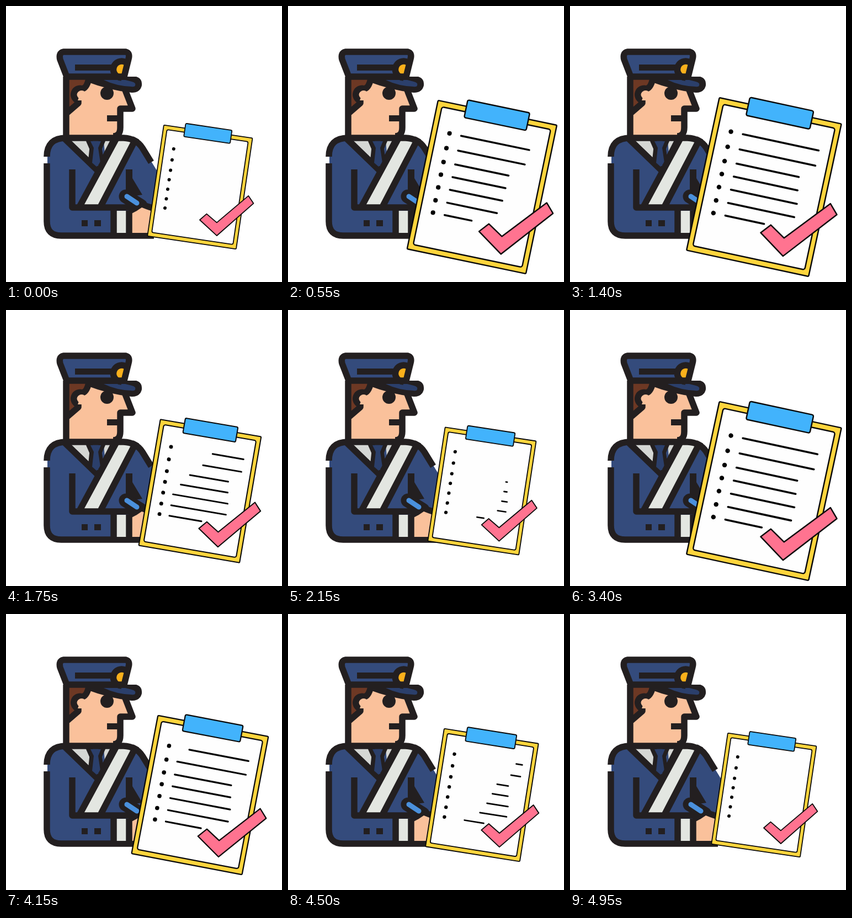
An HTML page for the animation above (5000 ms loop, 500 by 500 pixels).

```html
<!DOCTYPE html>
<html>
<head>
<meta charset="utf-8">
<style>
  html, body { margin: 0; height: 100%; overflow: hidden; background: #fff; }
  svg { display: block; width: 100vw; height: 100vh; }
  .ink { fill: none; stroke: #231f20; stroke-width: 11.5; stroke-linejoin: round; }
  .solid { fill: #231f20; }
  .navy { fill: #344b7c; }
  .dark { fill: #2b3f6b; }
  .skin { fill: #fac19b; }
  .pale { fill: #e3e6e1; }
  .collar { fill: #d5d7d4; }
  .board { stroke: #0a0a0a; stroke-width: 2.5; stroke-linejoin: round; }
  #rows line { stroke: #050505; stroke-width: 3.6; stroke-linecap: round; }
</style>
</head>
<body>
<svg viewBox="0 0 500 500">
  <!-- head -->
  <path class="skin" d="M109 130H213L229 186H207V222Q207 236 194 236H109Z"/>
  <path fill="#6d3824" d="M110 130H149L143 147Q122 147 122 160L130 178L110 196Z"/>
  <path class="ink" d="M109 128V238M109 195L131 176V171M215 150L229 186H207V220Q207 236 194 236"/>
  <path class="ink" d="M150 132Q146 149 138 150A11 11 0 0 0 130 171"/>
  <circle class="skin" cx="137" cy="161" r="8"/>
  <circle class="solid" cx="183" cy="158" r="12"/>
  <path class="solid" d="M183 198h23v11h-23z"/>
  <!-- cap -->
  <path class="solid" d="M146 128H236Q247 131 246 144Q243 157 228 157Q188 153 146 137Z"/>
  <path class="dark" d="M177 134H216L228 137Q236 139 234 144Q233 147 227 146Q200 145 177 134Z"/>
  <path class="navy" d="M104 83H217Q225 85 222 96L214 128H110L98 97Q95 85 104 83Z"/>
  <path class="solid" d="M125 106h70v11h-70z"/>
  <path class="ink" style="fill:#fab01b" d="M217 102A15 15 0 1 0 209 130"/>
  <path class="ink" d="M104 83H217Q225 85 222 96L214 128H110L98 97Q95 85 104 83Z"/>
  <!-- body -->
  <path class="navy" d="M75 273Q76 239 109 239H213Q236 240 247 257L264 283L290 325L258 416H100Q75 416 75 390Z"/>
  <path class="collar" d="M117 244H148L157 286ZM177 244H191L179 266Z"/>
  <path class="pale" d="M200 244H230L167 361H139Z"/>
  <path class="ink" d="M107 241L166 298M150 242L157 258L154 287M175 242L168 258L172 287M196 242L179 275"/>
  <path class="dark" d="M153 245H172L167 257L171 284L164 291L156 284L159 257Z"/>
  <path class="ink" d="M201 238L134 362M236 239L172 362M120 296V365H229"/>
  <path class="solid" d="M217 296H229V312L247 342L225 345H217Z"/>
  <path class="ink" d="M74 273Q74 239 109 239H213Q236 240 247 257L263 283M74 285V390Q74 416 100 416H268"/>
  <path class="solid" d="M137 388h11v11h-11zM160 388h12v11h-12z"/>
  <!-- hand and pen -->
  <path class="pale" d="M198 371h22v40h-22z"/>
  <path class="skin" d="M226 411V374Q238 363 250 364L275 368V411Z"/>
  <path class="ink" d="M195 365V416M223 371V416M223 372L246 360L272 368"/>
  <path class="ink" d="M217 345L244 362" stroke-linecap="round" style="stroke-width:25"/>
  <path class="skin" d="M229 411V377Q238 370 246 365L264 372V411Z"/>
  <path d="M219 345L237 357" stroke="#4a90dc" stroke-width="9" stroke-linecap="round"/>
  <!-- clipboard, drawn around its own centre at full size -->
  <g id="clipboard">
    <rect class="board" fill="#ffd53d" x="-113" y="-141.3" width="226" height="282.6" rx="2"/>
    <rect class="board" fill="#fefefe" x="-103.5" y="-131" width="207" height="262" rx="4"/>
    <rect class="board" fill="#42b3fc" x="-59" y="-153.5" width="118" height="33.5" rx="3"/>
    <g id="rows"></g>
    <path class="board" fill="#ff7390" d="M124 4L139.5 21L60 115L11.5 82L26.5 64.5L55 82.5Z"/>
  </g>
</svg>
<script>
  const LOOP = 5000, CYCLE = 2530, ROW_DELAY = 46, ROW_START = -57.5;
  const ROWS = [[-85.5, 83], [-57.4, 83], [-31, 58], [-7, 61], [17.2, 65], [41.8, 65.5], [65.2, 14.5]];
  // time in ms, growth from small (0) to large (1)
  const GROWTH = [[0, 0], [100, .05], [150, .14], [220, .36], [320, .69], [420, .81], [550, .9], [700, .96],
    [850, 1], [1400, 1], [1500, .9], [1570, .78], [1620, .65], [1650, .57], [1750, .36], [1870, .22],
    [2150, .07], [2420, 0], [CYCLE, 0]];

  const clamp = x => Math.min(1, Math.max(0, x));
  const clipboard = document.getElementById('clipboard');
  const rows = document.getElementById('rows');

  function add(tag, attributes) {
    const node = document.createElementNS('http://www.w3.org/2000/svg', tag);
    for (const key in attributes) node.setAttribute(key, attributes[key]);
    return rows.appendChild(node);
  }

  const lines = ROWS.map(([y]) => {
    add('circle', { cx: -79.6, cy: y, r: 4.2 });
    return add('line', { y1: y, y2: y });
  });

  function growthAt(t) {
    const i = GROWTH.findIndex(([time]) => time > t);
    const [t0, a] = GROWTH[i - 1], [t1, b] = GROWTH[i];
    return a + (b - a) * (t - t0) / (t1 - t0);
  }

  const drawn = t => 1 - Math.exp(-Math.max(0, t - 10) / 212);
  const erased = t => 1 - (1 - clamp((t - 1580) / 575)) ** 2;

  function render(now) {
    const t = now % LOOP % CYCLE, p = growthAt(t);
    const scale = (163.8 + 64.4 * p) / 228, angle = 8.4 + 3.75 * p;
    clipboard.setAttribute('transform', `translate(351.4 328) rotate(${angle}) scale(${scale})`);

    lines.forEach((line, i) => {
      const end = ROWS[i][1], length = end - ROW_START, local = t - i * ROW_DELAY;
      const x1 = ROW_START + length * erased(local);
      const x2 = ROW_START + length * drawn(local);
      line.setAttribute('x1', Math.min(x1, x2));
      line.setAttribute('x2', x2);
      line.style.display = x2 - x1 > 2.6 ? '' : 'none';
    });
  }

  function frame() {
    render(performance.now());
    requestAnimationFrame(frame);
  }
  frame();
</script>
</body>
</html>
```
